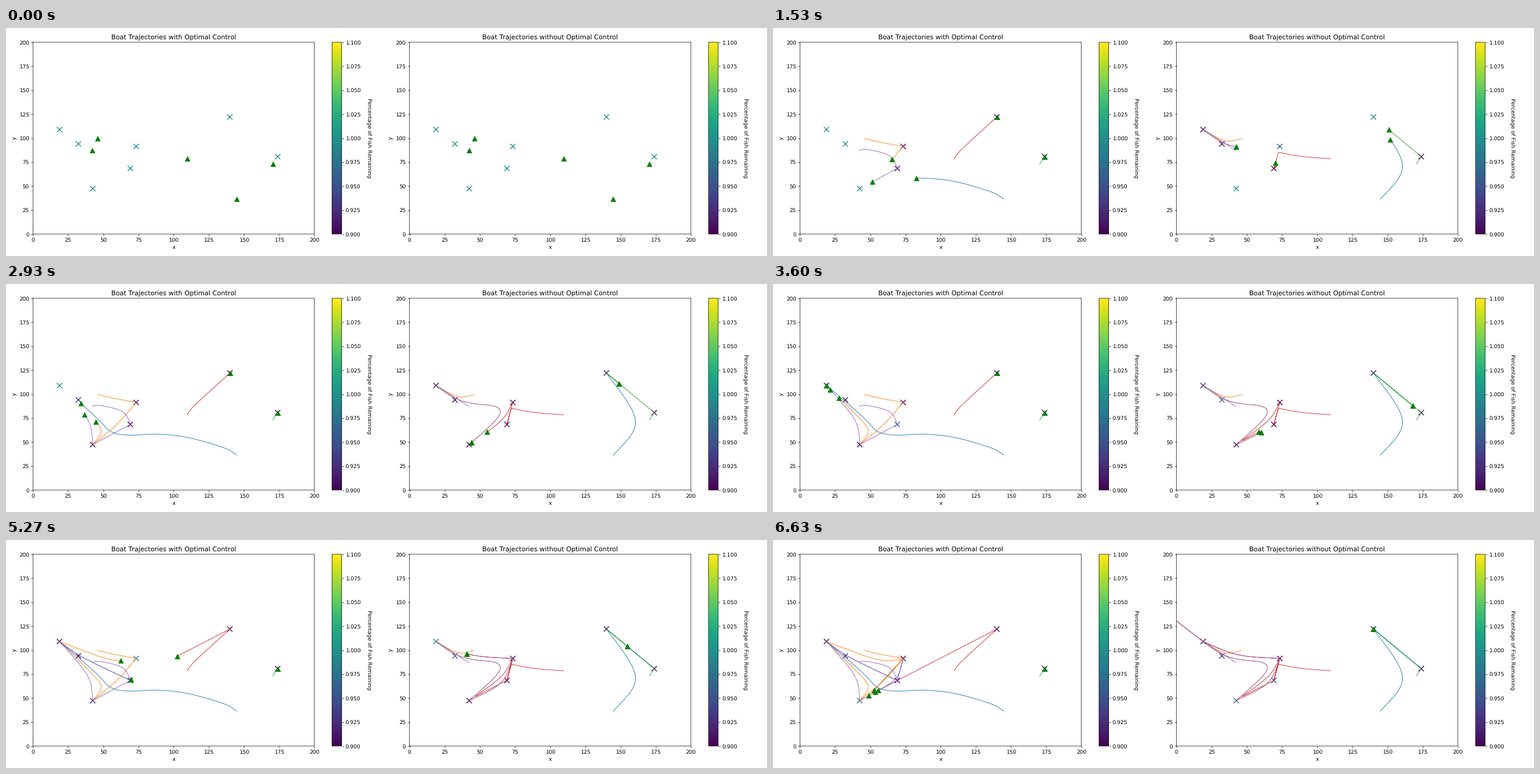
Write a matplotlib script that moves like this. It is 1280 px wide and 384 px high and loops after 6.66 s.

```python
import numpy as np
import matplotlib.pyplot as plt
from matplotlib.animation import FuncAnimation
from matplotlib.cm import ScalarMappable
from matplotlib.colors import Normalize

plt.rcParams.update({"text.hinting": "none", "text.hinting_factor": 1,
                     "path.snap": False})

WIDTH, HEIGHT, DPI = 1280, 384, 64
FRAMES, INTERVAL = 200, 33.3
NORM = Normalize(0.9, 1.1)

SPEED = 1.5                      # boat travel per frame
GROWTH, CATCH, REACH = 0.05, 0.12, 3

# Fishing grounds
A, B, C, D = (18.9, 109), (32.3, 94), (73.4, 91.3), (140, 122)
E, F, G = (174, 80.7), (69.2, 68.4), (42.5, 47.4)
GROUNDS = np.array([A, B, C, D, E, F, G])

# Boat starting points
S0, S1, S2 = (144.8, 36.4), (46.1, 99.7), (170.5, 73.1)
S3, S4 = (109.7, 78.4), (42.3, 87)

# A leg is an earliest departure, a start, optional bends and an end.
CONTROLLED = [
    [(0, S0, (138, 44), (98, 60), (57, 55.5), (47, 74), A),
     (114, A, B, F), (0, F, C), (0, C, (52.5, 57.7))],
    [(0, S1, (54, 96.5), C), (34.6, C, (60, 68), G),
     (0, G, (50.5, 61), (43, 74.5), A),
     (125.7, A, (58, 87), C), (168.5, C, (49, 52.5))],
    [(18.8, S2, E)],
    [(0, S3, (111.8, 84.5), D), (126.7, D, (53.5, 56.5))],
    [(0, S4, (44, 89.5), (65.5, 83), F), (29.8, F, G),
     (66.4, G, (41.5, 72), A),
     (114, A, B, F), (0, F, C), (0, C, (70, 70), (54, 56.5))],
]

SHUTTLE = [(78.6, D, E), (138, E, D)]
LEAVE = [(136, C, (43, 93.5), A), (0, A, (-4, 135))]
PAIR = [(25, A, (36, 90.5), (73, 87), G), (93.5, G, (67, 64.5), C), *LEAVE]
TURN, SHORT_OF_G = (72.4, 85.4), (46.5, 51.5)

UNCONTROLLED = [
    [(0, S0, (166.6, 70), D), *SHUTTLE],
    [(0, S1, (35, 95), A), *PAIR],
    [(0, S2, E), (20.8, E, D), *SHUTTLE],
    [(0, S3, (86, 81), TURN), (0, TURN, F), (41, F, C),
     (64, C, (67, 73), SHORT_OF_G), (98, SHORT_OF_G, F), (119.5, F, C),
     *LEAVE],
    [(0, S4, A), *PAIR],
]


def smooth(points, rounds=4):
    """Round the corners of a polyline, keeping its two ends."""
    p = np.array(points, float)
    if len(p) < 3:
        return p
    for _ in range(rounds):
        cut = np.stack([.75 * p[:-1] + .25 * p[1:],
                        .25 * p[:-1] + .75 * p[1:]], axis=1).reshape(-1, 2)
        p = np.vstack([p[:1], cut[1:-1], p[-1:]])
    return p


def boat_track(legs):
    """Position at every frame, at one speed with waits between legs."""
    t = np.arange(FRAMES)
    track = np.tile(np.array(legs[0][1], float), (FRAMES, 1))
    arrival = 0
    for depart, *points in legs:
        start = max(depart, arrival)
        p = smooth(points)
        s = np.r_[0, np.cumsum(np.hypot(*np.diff(p, axis=0).T))]
        going = t >= start
        d = SPEED * (t[going] - start)
        track[going] = np.column_stack([np.interp(d, s, p[:, k])
                                        for k in (0, 1)])
        arrival = start + s[-1] / SPEED
    return track


def fish_stock(tracks):
    """Logistic regrowth, less the catch of the boats close by."""
    gaps = GROUNDS[:, None, None] - np.array(tracks)
    effort = np.exp(-np.hypot(gaps[..., 0], gaps[..., 1]) / REACH).sum(axis=1)
    stock = np.ones((len(GROUNDS), FRAMES))
    for n in range(1, FRAMES):
        x = stock[:, n - 1]
        stock[:, n] = x + x * (GROWTH * (1 - x) - CATCH * effort[:, n])
    return stock


fig = plt.figure(figsize=(WIDTH / DPI, HEIGHT / DPI), dpi=DPI)


def pixel_axes(left, width):
    return fig.add_axes([left / WIDTH, 37 / HEIGHT,
                         width / WIDTH, 323 / HEIGHT])


class Panel:
    def __init__(self, left, title, boats):
        self.tracks = [boat_track(legs) for legs in boats]
        self.stock = fish_stock(self.tracks)
        ax = pixel_axes(left, 473.2)
        ticks = range(0, 201, 25)
        ax.set(xlim=(0, 200), ylim=(0, 200), xlabel="x", ylabel="y",
               title=title, xticks=ticks, yticks=ticks)
        self.fish = ax.scatter(*GROUNDS.T, c=self.stock[:, 0], s=100,
                               marker="x", cmap="viridis", norm=NORM)
        self.lines = [ax.plot([], [], lw=1)[0] for _ in boats]
        self.boats = [ax.plot([], [], "g^", markersize=8)[0] for _ in boats]
        bar = fig.colorbar(ScalarMappable(NORM, "viridis"),
                           cax=pixel_axes(left + 503, 16.2),
                           ticks=np.linspace(.9, 1.1, 9), format="%.3f")
        bar.set_label("Percentage of Fish Remaining", rotation=270,
                      labelpad=20)

    def show(self, n):
        self.fish.set_array(self.stock[:, n])
        for track, line, boat in zip(self.tracks, self.lines, self.boats):
            line.set_data(*track[:n + 1].T)
            boat.set_data(*track[n:n + 1].T)
        return [self.fish, *self.lines, *self.boats]


panels = [
    Panel(45.3, "Boat Trajectories with Optimal Control", CONTROLLED),
    Panel(678.7, "Boat Trajectories without Optimal Control", UNCONTROLLED),
]


def update(n):
    return [artist for panel in panels for artist in panel.show(n)]


anim = FuncAnimation(fig, update, frames=FRAMES, interval=INTERVAL,
                     init_func=lambda: update(0), repeat=True,
                     repeat_delay=0)
plt.show()
```
